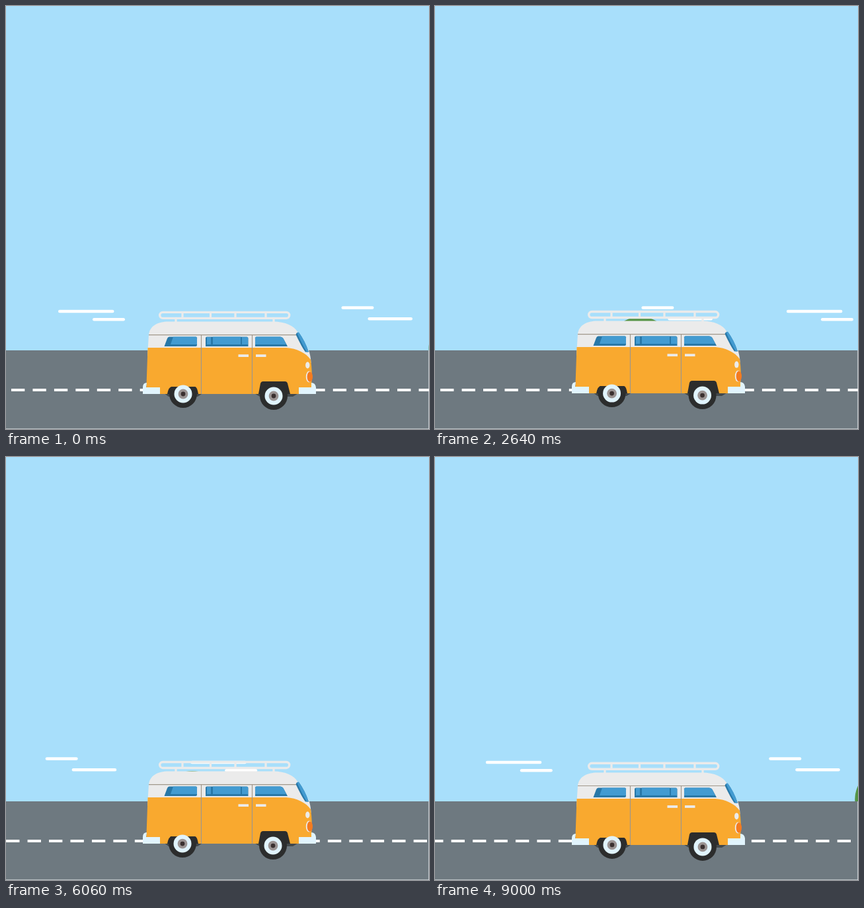
Animation, 640 px wide and 640 px high, one loop 9030 ms. Source, as an HTML page with a canvas:

```html
<!DOCTYPE html>
<html lang="en">
<head>
<meta charset="utf-8">
<title>Van on the road</title>
<style>
  html, body { margin: 0; width: 100%; height: 100%; overflow: hidden; background: #a8dffb; }
  canvas { display: block; width: 640px; height: 640px; }
</style>
</head>
<body>
<canvas id="stage" width="640" height="640"></canvas>
<script>
const ctx = document.getElementById('stage').getContext('2d');
const LOOP = 9030, STEP = 30, CYCLE = 299;
const SKY = '#a8dffb', ROAD = '#6e7980', LEAF = '#549345', ORANGE = '#f9a92f',
      SHELL = '#ebebeb', GLASS = '#439bd1', SHADE = '#2878a8', TYRE = '#2c2d2d',
      CHROME = '#e1f4fd', SEAM = '#a0978a';

function rect(x, y, w, h, color) {
  ctx.fillStyle = color;
  ctx.fillRect(x, y, w, h);
}
function disc(x, y, r, color, ry = r) {
  ctx.fillStyle = color;
  ctx.beginPath();
  ctx.ellipse(x, y, r, ry, 0, 0, 7);
  ctx.fill();
}
function shape(d, color) {
  ctx.fillStyle = color;
  ctx.fill(new Path2D(d));
}
function stroke(d, color, width, cap = 'butt') {
  ctx.strokeStyle = color;
  ctx.lineWidth = width;
  ctx.lineCap = cap;
  ctx.stroke(new Path2D(d));
}

function clouds(shift) {
  for (const copy of [0, 648]) {
    const x = copy - shift;
    for (const [left, y, len] of [[79, 462, 84.5], [131, 474.3, 49], [507.5, 456.5, 49], [547.5, 473.3, 67.5]])
      stroke(`M${x + left + 2.2} ${y}h${len - 4.4}`, '#fff', 4.4, 'round');
  }
}

function bush(x, dy) {
  for (const [dx, y, r] of [[0, 518, 48], [46, 507, 18], [64, 530, 23], [111.5, 503, 18], [105, 532, 24]])
    disc(x + dx, y + dy, r, LEAF);
}

function road(shift) {
  rect(0, 521, 640, 119, '#e4eaed');
  rect(0, 521, 639.3, 118.4, ROAD);
  const gap = 32.45;
  const first = (((8 - shift) % gap) + gap) % gap - gap;
  for (let x = first; x < 640; x += gap) rect(x, 579, 20.3, 4, '#fff');
}

function rack() {
  ctx.strokeStyle = SHELL;
  ctx.lineWidth = 3.4;
  ctx.beginPath();
  ctx.roundRect(232.7, 463.4, 196, 9, 4.5);
  ctx.stroke();
  stroke('M267 463v10M309.5 463v10M347 463v10M393 463v10M257 473v6M405 473v6', SHELL, 3.2);
}

function body() {
  shape('M238 585H299L290 591H246ZM374 585H444L434 591H384Z', '#42484b');
  shape('M214 530L216 497C218 484 229 477.5 246 477.5H404C423 477.5 436 484 441 493L458 521Q461 529 461.5 540L440 545Z', SHELL);
  shape('M214.5 517H424C440 518 454 525 461 535Q464 555 462 575V587H212Z', ORANGE);
  stroke('M216 497.6H441M295.5 497.5V587M372.5 497.5V587', SEAM, 1.2);
}

function windows() {
  shape('M247 500.5H287Q289 500.5 289 502.5V513Q289 515 287 515H239.5L244 503Q245 500.5 247 500.5Z', SHADE);
  shape('M253 500.5H287Q289 500.5 289 502.5V512H249Z', GLASS);

  shape('M304 500.5H364Q366.5 500.5 366.5 503V515H302V502.5Q302 500.5 304 500.5Z', SHADE);
  rect(304, 501, 6, 11, GLASS);
  rect(313, 500.5, 42, 11.5, GLASS);
  rect(357, 501, 9, 11, GLASS);

  shape('M379 500.5H415Q418 500.5 419.5 503L426 515H377V502.5Q377 500.5 379 500.5Z', SHADE);
  shape('M379 500.5H415Q418 500.5 419.5 503L424 512H377V502.5Q377 500.5 379 500.5Z', GLASS);

  shape('M438.5 497Q440 493 443 494Q452 506 458 523.5H453Q448 517 438.5 497Z', SHADE);
  shape('M440.5 495Q441.5 493 443 494Q452 506 458 523.5H455Q448 512 440.5 495Z', GLASS);
}

function trim() {
  rect(351.5, 527.2, 15.5, 3.8, SHELL);
  rect(378, 527.2, 15.5, 3.8, SHELL);
  disc(456.3, 543.5, 3.2, SHELL, 5);
  disc(458.5, 561, 4.7, SHELL, 8.5);
  disc(459.8, 561, 4.2, '#f47b20', 7.8);
  shape('M207 587V577Q207 570 213 570L212 577H233V587Z', CHROME);
  shape('M469 587V577Q468 570 462 570V577H443V587Z', CHROME);
}

function hub(x, y) {
  disc(x, y, 13.5, CHROME);
  disc(x, y, 7.4, '#9b9493');
  disc(x, y, 3.4, '#3a3030');
}

function wheels(sway) {
  shape('M244 587Q246 576 251 576H286Q289 576 291 587Z', TYRE);
  shape('M382 587L385 571Q386 568 389 568H422Q425 568 426 571L430 587Z', TYRE);
  ctx.save();
  ctx.beginPath();
  ctx.rect(230, 576, 80, 50);
  ctx.clip();
  disc(268 + sway, 587, 21, TYRE);
  ctx.restore();
  hub(268 + sway, 587);
  disc(405 + sway, 590, 21, TYRE);
  hub(405 + sway, 590);
}

function van(lift) {
  ctx.save();
  ctx.translate(0, -lift);
  rack();
  body();
  windows();
  wheels(-lift / 2);
  trim();
  ctx.restore();
}

function draw(now) {
  const tick = Math.floor((now % LOOP) / STEP);
  const n = tick % CYCLE;
  rect(0, 0, 640, 640, SKY);
  clouds(n * 2.217);
  bush(687.6 - n * 4.284, 0);
  bush(1147 - n * 4.284, 5);
  road(tick * 4.055);
  van(1 - Math.cos(n / 13 * 2 * Math.PI));
}

const start = performance.now();
function loop() {
  draw(performance.now() - start);
  requestAnimationFrame(loop);
}
loop();
</script>
</body>
</html>
```
